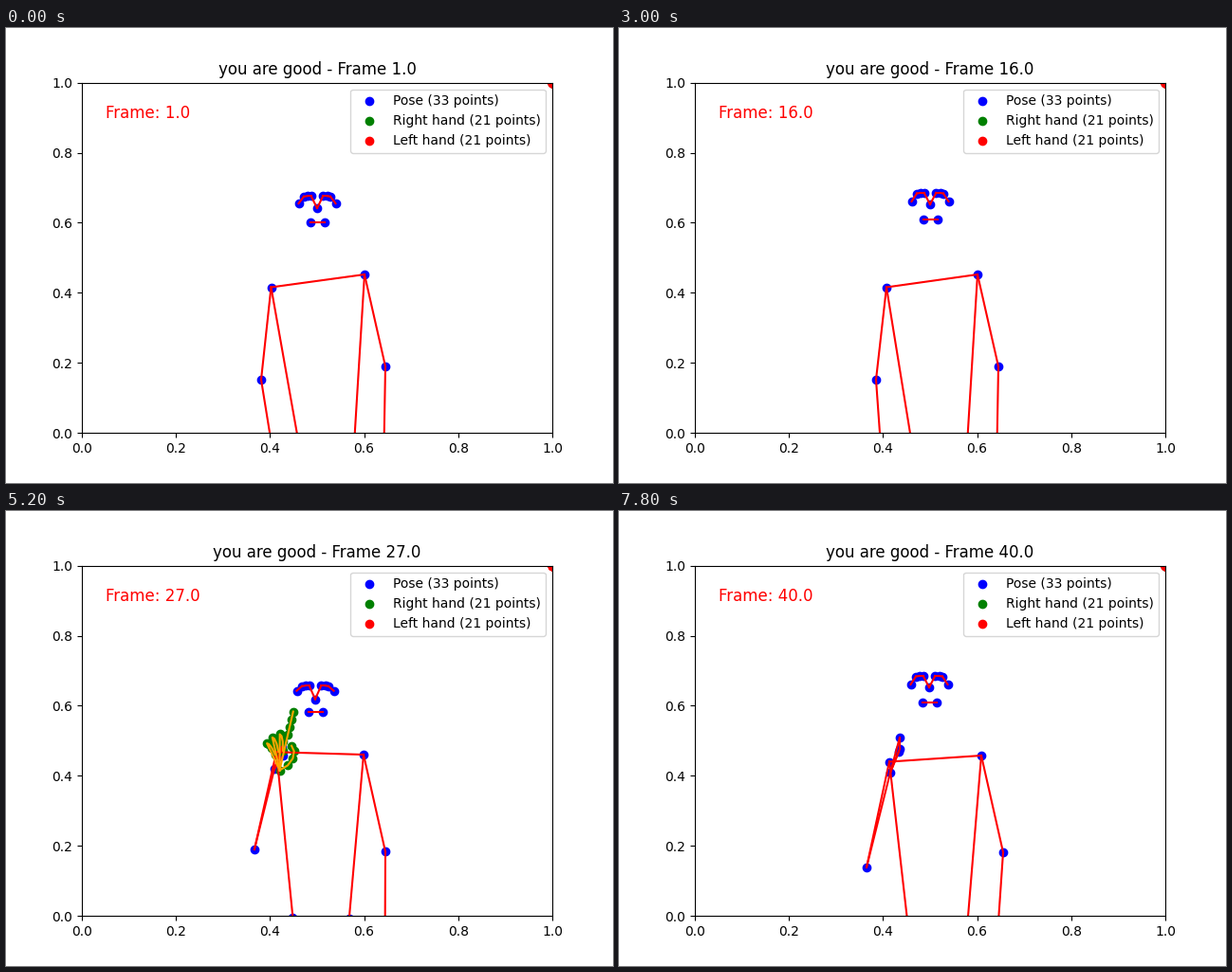
A matplotlib script for the animation above (8000 ms loop, 640x480 px).

```python
import numpy as np
import matplotlib.pyplot as plt
from matplotlib.animation import FuncAnimation

FRAMES = 40
STEP_MS = 200
HAND_FIRST, HAND_LAST = 21, 32

# Key points: frame number, x, y in stage pixels.
NOSE = [(1, 328, 190), (9, 327, 186), (16, 328, 186), (24, 325, 194),
        (30, 327, 203), (35, 330, 192), (40, 327, 186)]
RIGHT_WRIST = [(1, 285, 470), (9, 279, 470), (17, 278, 470), (24, 289, 270),
               (30, 277, 274), (35, 280, 309), (40, 286, 276)]

POSE_LINKS = """nose-l_in l_in-l_mid l_mid-l_out l_out-l_ear
nose-r_in r_in-r_mid r_mid-r_out r_out-r_ear l_lip-r_lip
l_sho-r_sho l_sho-l_elb l_elb-l_wri r_sho-r_elb r_elb-r_wri
r_wri-r_pin r_wri-r_ind r_wri-r_thu r_pin-r_ind
l_sho-l_hip r_sho-r_hip l_hip-r_hip"""
POSE_LINKS = [link.split("-") for link in POSE_LINKS.split()]
FINGERS = [[0] + list(range(k, k + 4)) for k in range(1, 21, 4)]


def to_axes(p):
    p = np.asarray(p, float)
    return np.column_stack([(p[:, 0] - 80) / 496, (427.2 - p[:, 1]) / 369.6])


def ease(n, start, end):
    t = np.clip((n - start) / (end - start), 0, 1)
    return t * t * (3 - 2 * t)


def path(n, keys):
    pos = np.array(keys[0][1:], float)
    for (n0, *p0), (n1, *p1) in zip(keys, keys[1:]):
        pos += np.subtract(p1, p0) * ease(n, n0, n1)
    return pos


def face(nose):
    """Features around the nose; lowering the head tips them back."""
    x, y = nose
    tip = (y - 186) / 17
    points = {"nose": (x, y)}
    for side, s in (("l", 1), ("r", -1)):
        eye = y - 12 - 3 * tip
        points |= {
            side + "_in": (x + 6.3 * s, eye),
            side + "_mid": (x + 10.5 * s, eye),
            side + "_out": (x + 14 * s, eye + 0.5),
            side + "_ear": (x + 19.5 * s, y - 3 - 8 * tip),
            side + "_lip": (x + 0.5 + 7.5 * s, y + 16 - 3.5 * tip),
        }
    return points


def pose_at(n):
    nose, wrist = path(n, NOSE), path(n, RIGHT_WRIST)
    settle = 1 - ease(n, 1, 9)
    lift = ease(n, 17, 24)
    sway = ease(n, 30, 38)
    bow = lift * (nose[1] - 186) / 17
    wx, wy = wrist
    return face(nose) | {
        "l_sho": (378 - lift + 5 * sway, 260 - 3 * lift + sway),
        "l_elb": (400 + 5 * sway, 357 + lift + 2 * bow + 2 * sway),
        "l_wri": (398 + 1.5 * lift - 2 * sway, 470),
        "l_hip": (367 - 1.5 * lift - 5 * bow + 2 * sway,
                  440 - 9 * lift - 2 * bow + 3 * sway),
        "r_sho": (282 - 2.5 * settle + 2 * lift + 1.5 * bow + sway,
                  273.5 - 17 * lift - 3 * bow + 8 * sway),
        "r_elb": (271 - 2 * settle - lift - 11 * bow - 9 * sway,
                  371 - 19 * bow + 5 * sway),
        "r_hip": (309 - 5.5 * lift - 1.5 * bow + sway,
                  440 - 4 * lift - 10 * bow),
        "r_wri": (wx, wy),
        "r_pin": (wx + 7 + 3 * sway, wy - 20 - 17 * sway),
        "r_ind": (wx + 8 + 2 * sway, wy - 23 - 2 * sway),
        "r_thu": (wx + 9, wy - 14 - 8 * sway),
    }


def hand_at(n, wrist):
    """Fan of fingers: index stretched, thumb and the rest folded in."""
    curl = ease(n, 24, 30)
    joint = np.arange(4)
    angles = [52 - 11 * joint + 14 * curl]
    radii = [36 * np.sin(np.radians(20 * (joint + 1))) * (1 - 0.38 * curl)]
    for k in range(4):
        base = (42 - 0.9 * k * k) * (1 - 0.15 * curl)
        if k == 0:
            reach, twist = np.linspace(1, 1.75 - 0.23 * curl, 4), 0
        else:
            reach, twist = 1 - 0.05 * joint ** 2, 3
        angles.append(13 - (10.5 + 4.5 * curl) * k + twist * joint)
        radii.append(base * reach)
    a, r = np.radians(np.concatenate(angles)), np.concatenate(radii)
    fan = np.column_stack([r * np.sin(a), -r * np.cos(a)])
    root = np.add(wrist, (3 + 5 * curl, -3 + 9 * curl))
    return to_axes(root + np.vstack([(0, 0), fan]))


fig, ax = plt.subplots(figsize=(6.4, 4.8), dpi=100)
ax.set_xlim(0, 1)
ax.set_ylim(0, 1)
corner = np.ones((21, 2))
body_dots = ax.scatter([], [], c="blue", label="Pose (33 points)")
right_dots = ax.scatter(*corner.T, c="green", label="Right hand (21 points)")
ax.scatter(*corner.T, c="red", label="Left hand (21 points)")
body_lines = [ax.plot([], [], color="red")[0] for _ in POSE_LINKS]
hand_lines = [ax.plot([], [], color="orange")[0] for _ in FINGERS]
title = ax.set_title("")
counter = ax.text(0.05, 0.9, "", color="red", fontsize=12)
ax.legend(loc="upper right")


def draw(i):
    n = i + 1
    pose = pose_at(n)
    points = dict(zip(pose, to_axes(list(pose.values()))))
    body_dots.set_offsets(list(points.values()))
    for line, (a, b) in zip(body_lines, POSE_LINKS):
        line.set_data(*zip(points[a], points[b]))

    seen = HAND_FIRST <= n <= HAND_LAST
    hand = hand_at(n, pose["r_wri"]) if seen else corner
    right_dots.set_offsets(hand)
    for line, joints in zip(hand_lines, FINGERS):
        line.set_data(*hand[joints].T)
        line.set_visible(seen)

    title.set_text(f"you are good - Frame {n:.1f}")
    counter.set_text(f"Frame: {n:.1f}")
    return []


anim = FuncAnimation(fig, draw, frames=FRAMES, interval=STEP_MS,
                     init_func=lambda: draw(0), repeat=True, repeat_delay=0)
plt.show()
```
